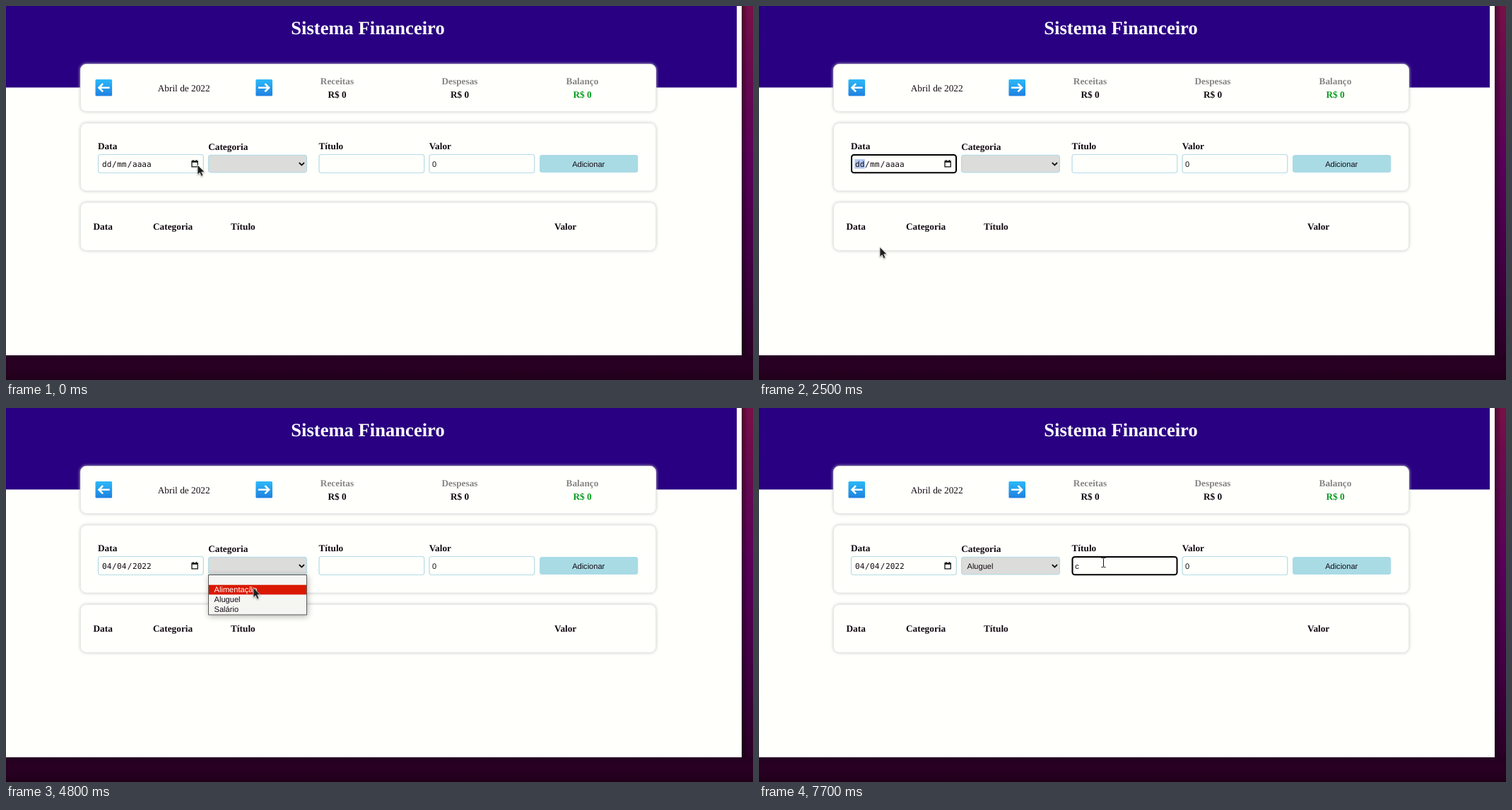
Animation of 1057 by 530 pixels, one loop 8000 ms. Source, as an HTML page:

```html
<!DOCTYPE html>
<html lang="pt-BR">
<head>
<meta charset="utf-8">
<title>Sistema Financeiro</title>
<style>
  html, body { margin: 0; width: 100%; height: 100%; overflow: hidden; background: #27001f; }
  svg { display: block; width: 1057px; height: 530px; }
  text { white-space: pre; text-rendering: geometricPrecision; fill: #120a12; }
  .serif { font: 13.3px "Liberation Serif", "Times New Roman", serif; }
  .sans { font: 11.07px "Liberation Sans", Arial, sans-serif; }
  .day { font: 10px "Liberation Sans", Arial, sans-serif; }
  .mono { font: 11.07px "DejaVu Sans Mono", monospace; }
  .bold { font-weight: bold; }
  .mid { text-anchor: middle; }
  .card { fill: #fffffc; stroke: #e6ebe6; filter: drop-shadow(0 0 2px #c9cdc9); }
  .field { fill: #fffffc; stroke: #b4dbe5; stroke-width: 1.2; }
  .focus { fill: none; stroke: #000; stroke-width: 2; }
  .line { fill: none; stroke: #111; }
  .popup { filter: drop-shadow(1px 2px 4px rgba(0, 0, 0, .3)); }
</style>
</head>
<body>
<svg id="stage" viewBox="0 0 1057 530">
  <defs>
    <linearGradient id="wall" x2="0" y2="1">
      <stop offset="0" stop-color="#780f48"/>
      <stop offset=".2" stop-color="#670851"/>
      <stop offset=".42" stop-color="#590058"/>
      <stop offset=".7" stop-color="#410042"/>
      <stop offset=".93" stop-color="#2a0026"/>
      <stop offset="1" stop-color="#22001a"/>
    </linearGradient>
    <linearGradient id="floor" x2="0" y2="1">
      <stop offset="0" stop-color="#240020"/>
      <stop offset=".4" stop-color="#290024"/>
      <stop offset="1" stop-color="#21001a"/>
    </linearGradient>
    <linearGradient id="edge">
      <stop offset="0" stop-color="#000" stop-opacity=".4"/>
      <stop offset="1" stop-color="#000" stop-opacity="0"/>
    </linearGradient>
    <linearGradient id="tile" x2="0" y2="1">
      <stop offset="0" stop-color="#2cb9f8"/>
      <stop offset="1" stop-color="#1f80e0"/>
    </linearGradient>
  </defs>
  <rect width="1057" height="530" fill="url(#wall)"/>
  <rect x="1041" width="9" height="495" fill="url(#edge)"/>
  <rect y="495" width="1057" height="35" fill="url(#floor)"/>
  <rect width="1041" height="495" fill="#fffffc"/>
  <rect width="1034" height="115.5" fill="#290081"/>
  <g id="page"></g>
  <g id="picker" class="popup"></g>
  <g id="list" class="popup"></g>
  <path id="arrow" d="M0 0V14.2L3.2 11.2L5.4 16.2L7.9 15.1L5.7 10.3H10Z"
        fill="#1c1c1c" stroke="#fff" stroke-width=".7"
        style="filter: drop-shadow(.5px 1px .8px rgba(0,0,0,.35))"/>
  <path id="beam" class="line" d="M-3 -6.5H-1Q0 -6.5 0 -5.5Q0 -6.5 1 -6.5H3M0 -5.5V5.5M-3 6.5H-1Q0 6.5 0 5.5Q0 6.5 1 6.5H3"/>
</svg>
<script>
const LOOP = 8000;
const $ = id => document.getElementById(id);

function add(parent, tag, attrs, text) {
  const el = document.createElementNS("http://www.w3.org/2000/svg", tag);
  for (const key in attrs) el.setAttribute(key, attrs[key]);
  if (text !== undefined) el.textContent = text;
  parent.append(el);
  return el;
}
const label = (parent, text, x, y, cls, style = "") =>
  add(parent, "text", { x, y, class: cls, style }, text);
const box = (parent, x, y, width, height, attrs) =>
  add(parent, "rect", { x, y, width, height, ...attrs });
const path = (parent, d, attrs) => add(parent, "path", { d, class: "line", ...attrs });
const show = (el, on) => { el.style.display = on ? "" : "none"; };

// Page
const page = $("page");
label(page, "Sistema Financeiro", 512, 40, "serif bold mid", "font-size:26.6px;fill:#fffffc");
for (const [y, h] of [[82.5, 67], [166, 96], [278.5, 68]])
  box(page, 105.5, y, 814, h, { rx: 8, class: "card" });

for (const [x, dir] of [[138.3, 1], [365.2, -1]]) {
  box(page, x - 11.8, 104, 23.6, 23.6, { rx: 1.5, fill: "url(#tile)" });
  path(page, "M8.3 0H-6M-1.2 -5.6L-6.8 0L-1.2 5.6", {
    transform: `translate(${x} 115.8) scale(${dir} 1)`, style: "stroke:#fff;stroke-width:2.6"
  });
}
label(page, "Abril de 2022", 251.7, 120.5, "serif mid");
for (const [name, x, color] of [["Receitas", 468.5, ""], ["Despesas", 642, ""], ["Balanço", 815.5, "fill:#069e1e"]]) {
  label(page, name, x, 110.5, "serif bold mid", "fill:#878585");
  label(page, "R$ 0", x, 129.5, "serif bold mid", color);
}
for (const [name, x, y] of [["Data", 130, 203], ["Categoria", 286.2, 204], ["Título", 442.5, 203], ["Valor", 598.7, 203],
  ["Data", 123.5, 317], ["Categoria", 208, 317], ["Título", 318, 317], ["Valor", 776, 317]])
  label(page, name, x, y, "serif bold");

for (const x of [130.5, 443, 599]) box(page, x, 210.5, 148.8, 26, { rx: 3.5, class: "field" });
box(page, 286.5, 211.3, 139, 24.5, { rx: 3.5, class: "field", style: "fill:#dcdcda" });
box(page, 755, 211, 139.3, 25, { rx: 3.5, fill: "#a9dbe5" });
label(page, "Adicionar", 824.2, 228, "sans mid");
label(page, "0", 603, 228, "sans");
path(page, "M414.8 222L418.4 225.6L422 222", { "stroke-width": 1.8 });
path(page, "M263 220H271.2V227.8H263ZM263 221H271.2M264.8 218V220M269.4 218V220", { "stroke-width": 1.3 });

const mark = box(page, 135.3, 217, 14.5, 13.5, { fill: "#b3c8f2" });
const dateParts = [136, 157, 179].map(x => label(page, "", x, 228, "mono"));
for (const x of [150, 171.7]) label(page, "/", x, 228, "mono");
const chosen = label(page, "Aluguel", 294.5, 228, "sans");
const typed = label(page, "c", 447.2, 228, "sans");
const caret = box(page, 447, 218, 1, 12, { fill: "#000" });
const ring = (x, y, w, h) => box(page, x, y, w, h, { rx: 3.5, class: "focus" });
const dateRing = ring(131, 211, 148, 25.3);
const selectRing = ring(287, 211.7, 138.2, 23.8);
const titleRing = ring(443.5, 211, 148, 25.3);

// Date picker
const picker = $("picker");
const STEP = 23.3;
box(picker, 130.8, 237.5, 180, 232, { fill: "#fffffc", stroke: "#bdbdbd" });
label(picker, "abril de 2022", 139.5, 259.3, "day bold");
path(picker, "M203.3 254.3H209.7L206.5 257.7Z", { style: "fill:#111;stroke:none" });
path(picker, "M264 263.5V250.5M258 256.5L264 250.5L270 256.5");
path(picker, "M290.8 250.5V263.5M284.8 257.5L290.8 263.5L296.8 257.5");
const hover = box(picker, 0, 0, 23, 23, { fill: "#b0c8f1" });
box(picker, 163.6, 322.7, 21.6, 21.6, { fill: "#4a00ef", stroke: "#000", "stroke-width": 2 });
[..."DSTQQSS"].forEach((d, i) => label(picker, d, 151 + STEP * i, 290, "day mid"));
for (let i = 0; i < 42; i++) {
  const n = i - 4;
  const other = n < 1 || n > 30;
  const day = n < 1 ? n + 31 : n > 30 ? n - 30 : n;
  const style = other ? "fill:#777" : n === 4 ? "fill:#fff" : "";
  label(picker, day, 151 + STEP * (i % 7), 314 + STEP * Math.floor(i / 7),
    "day mid" + (n === 4 ? " bold" : ""), style);
}
label(picker, "Limpar", 148.8, 456, "day", "fill:#1463bd");
label(picker, "Hoje", 272.8, 456, "day", "fill:#1f4ac6");

// Category list
const list = $("list");
const ROW = 13.7, LIST_TOP = 237;
box(list, 286.5, 236.5, 139, 56.5, { fill: "#f5f5f2", stroke: "#5c5c5c" });
const bar = box(list, 287, LIST_TOP, 138, ROW, { fill: "#d91800" });
const options = ["", "Alimentação", "Aluguel", "Salário"].map((name, i) =>
  label(list, name, 294.6, LIST_TOP + 10.4 + ROW * i, "sans"));

// Pointer steps: time, x, y
const moves = [
  [0, 271, 225], [200, 270.5, 225.5], [500, 270, 225], [700, 268, 225],
  [1200, 259, 240], [1300, 240, 273], [1400, 226, 296],
  [1600, 228, 297], [1700, 224, 303], [1800, 214, 313], [1900, 203, 323],
  [2000, 191, 332], [2100, 180, 338], [2200, 171, 341.5],
  [2800, 204, 322], [2900, 257, 283], [3000, 293.5, 249.5],
  [3400, 330, 228], [3500, 360, 211], [3700, 361, 210.5], [3800, 361, 214],
  [4500, 359.5, 224], [4600, 357, 235], [4700, 353.5, 246], [4800, 350, 254.5],
  [4900, 346, 265], [5000, 342, 271.5],
  [5900, 385, 252], [6000, 440, 230], [6100, 487.5, 219]
];

function draw(t) {
  const within = (from, to) => t >= from && t < to;
  const [, x, y] = moves.findLast(m => m[0] <= t);
  const at = `translate(${x} ${y})`;
  $("arrow").setAttribute("transform", at);
  $("beam").setAttribute("transform", at);
  show($("arrow"), t < 6100);
  show($("beam"), t >= 6100);

  const values = t < 2800 ? ["dd", "mm", "aaaa"] : ["04", "04", "2022"];
  dateParts.forEach((el, i) => { el.textContent = values[i]; });
  show(dateRing, within(400, 3800));
  show(mark, within(400, 3800));
  show(selectRing, within(5500, 6500));
  show(chosen, t >= 5500);
  show(titleRing, t >= 6500);
  show(typed, t >= 7100);
  show(caret, within(6500, 6900) || within(7100, 7700));
  caret.setAttribute("x", t < 7100 ? 447 : 452.4);

  show(picker, within(400, 2500));
  const col = Math.floor((x - 139.3) / STEP);
  const row = Math.floor((y - 297) / STEP);
  show(hover, row >= 0);
  hover.setAttribute("x", 139.3 + STEP * col);
  hover.setAttribute("y", 298.7 + STEP * row);

  show(list, within(3800, 5500));
  const picked = Math.max(0, Math.min(3, Math.floor((y - LIST_TOP) / ROW)));
  bar.setAttribute("y", LIST_TOP + ROW * picked);
  options.forEach((el, i) => { el.style.fill = i === picked ? "#fff" : ""; });
}

const start = performance.now();
function tick() {
  draw((performance.now() - start) % LOOP);
  requestAnimationFrame(tick);
}
tick();
</script>
</body>
</html>
```
